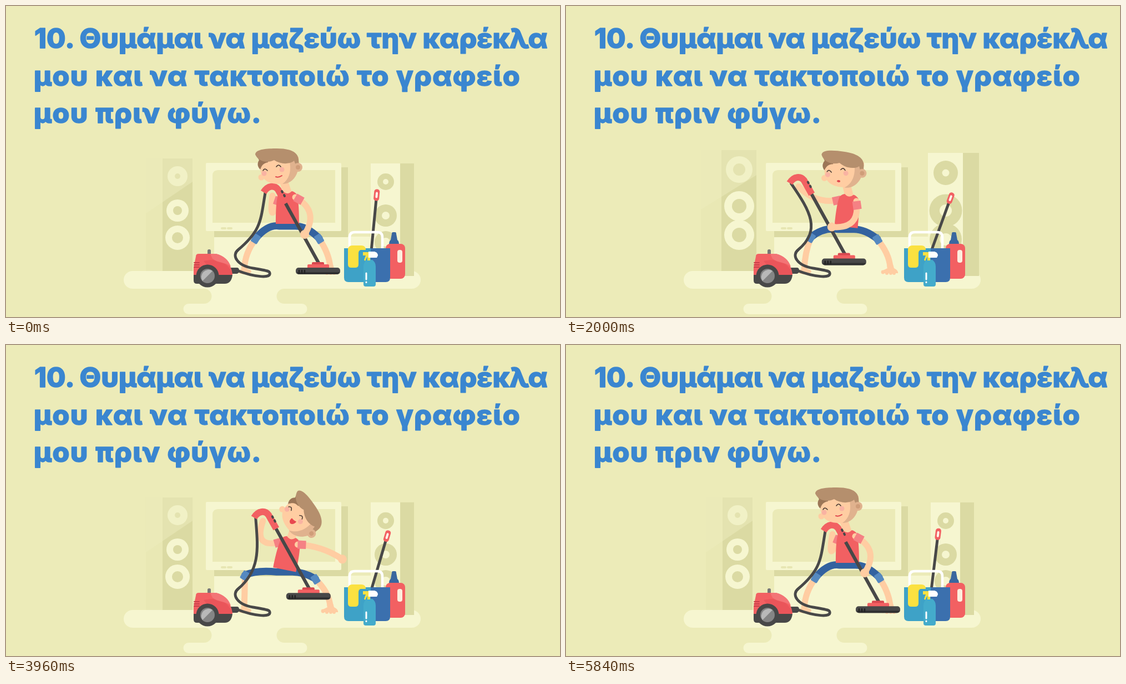
These frames come from a looping animation (998 by 561 pixels, 5.88 s). An HTML page:

```html
<!DOCTYPE html>
<html lang="el">
<head>
<meta charset="utf-8">
<title>Τακτοποίηση</title>
<style>
html, body { margin: 0; width: 100%; height: 100%; overflow: hidden; background: #ecebb8; }
svg { display: block; width: 998px; height: 561px; }
.title { font: 800 50px Inter, "Noto Sans", "Open Sans", sans-serif; fill: #3a86d0; stroke: #3a86d0; stroke-width: 1.5; stroke-linejoin: round; }
.loose { letter-spacing: 1.3px; }
.line { fill: none; stroke-linecap: round; stroke-linejoin: round; }
.skin { fill: #ffcda2; }
.limb { stroke: #ffcda2; stroke-width: 11; }
.cream { fill: #f6f6d0; }
.olive { fill: #dbdaa3; }
.red { fill: #f26062; }
.dark { fill: #484848; }
.hair { fill: #b58f6d; }
.hair2 { fill: #9c7657; }
.shade { fill: #e0b28e; }
.cheek { fill: #f9b3a2; }
.eye { stroke: #4b3b35; stroke-width: 1.6; }
.hose { stroke: #484848; stroke-width: 5; }
.sleeve { stroke: #f58184; stroke-width: 15; fill: none; }
.jeans { stroke: #33629f; stroke-width: 13; }
</style>
</head>
<body>
<svg viewBox="0 0 998 561">
  <g class="title">
    <text x="51" y="76">10. Θυμάμαι να μαζεύω την καρέκλα</text>
    <text x="50" y="144" class="loose">μου και να τακτοποιώ το γραφείο</text>
    <text x="50" y="211" class="loose">μου πριν φύγω.</text>
  </g>

  <!-- room -->
  <path class="cream" d="M228 510H357a13.5 13.5 0 0 1 0 27H329a9.5 9.5 0 0 0 0 19H533a9.5 9.5 0 0 0 0-19H501a13.5 13.5 0 0 1 0-27H731a16 16 0 0 0 0-32H228a16 16 0 0 0 0 32z"/>
  <path class="cream" d="M375 416H657V480H375z"/>
  <path class="olive" d="M375 291H616V417H375z"/>
  <rect class="cream" x="360" y="283" width="244" height="123" rx="2"/>
  <path fill="#ebeab7" d="M372 391V306q0-10 10-10H593V391z"/>
  <g fill="#e7e6b3"><rect x="387" y="399" width="10" height="4" rx="2"/><rect x="398" y="399" width="10" height="4" rx="2"/></g>

  <path id="sideL" fill="#e9e8b4"/>
  <path id="frontL" class="olive"/>
  <g id="conesL"></g>
  <path id="shine" fill="#eeedbd" opacity=".5"/>
  <path id="sideR" class="olive"/>
  <path id="frontR" class="cream"/>
  <g id="conesR"></g>

  <!-- cleaning kit -->
  <g id="mop">
    <path class="line hose" d="M0 0V-94"/>
    <rect class="red" x="-5" y="-112" width="10" height="21" rx="4.5"/>
    <rect fill="#fff3e8" x="-2" y="-107" width="4" height="11" rx="2"/>
  </g>
  <path class="line" stroke="#fff" stroke-width="4.5" d="M619 445V417q0-9 9-9H669q9 0 9 9V446"/>
  <path fill="#3a679f" d="M695 411q0-3 2-3h4q2 0 2 3l2 11q3 2 3 8h-18q0-6 3-8z"/>
  <rect class="red" x="684" y="429" width="35" height="63" rx="8"/>
  <rect fill="#fdeede" x="705" y="440" width="9" height="23" rx="4"/>
  <path fill="#3ea2c7" d="M609 437H660V498H617q-8 0-8-8z"/>
  <path fill="#3b70ae" d="M657 437H692V490q0 8-8 8H657z"/>
  <path fill="#fbe140" d="M616 440q0-8 8-8H640q8 0 8 8h-9q-4 1-4 6V466q0 6-6 6h-7q-6 0-6-6z"/>
  <path fill="#44abcb" d="M650 458H660q6 4 6 12V502q0 4-4 4H648q-4 0-4-4V470q0-8 6-12z"/>
  <path fill="#fbe140" d="M643 444H653L656 449V459H651V452L647 460 645 458 648 450H643z"/>
  <path fill="#fff" d="M653 443H664q6 2 6 7l-2 4H653z"/>
  <path class="line" stroke="#fff" stroke-width="3" d="M649 482V493M649 498v.5"/>

  <!-- boy -->
  <path id="shins" class="line limb"/>
  <path class="skin" d="M578 466H589L591 473Q599 477 598 482H570Q566 480 571 477L579 473z"/>
  <g class="skin"><circle cx="571" cy="480" r="3.4"/><circle cx="578" cy="482" r="3"/><circle cx="585" cy="482" r="3"/><circle cx="591" cy="482" r="3"/><ellipse cx="430" cy="479" rx="12" ry="5"/></g>
  <path id="jeans" class="line jeans"/>
  <g fill="#5589c0">
    <rect id="cuffL" x="-6.5" y="-8" width="13" height="16" rx="2"/>
    <rect id="cuffR" x="-6.5" y="-8" width="13" height="16" rx="2"/>
  </g>
  <path id="armL" class="line limb"/>
  <path id="neck" class="line" stroke="#ffcda2" stroke-width="15"/>
  <path id="sleeveL" class="sleeve"/>
  <path id="shirt" class="red"/>
  <path id="hose" class="line hose"/>
  <g id="vac">
    <path class="line" stroke="#484848" stroke-width="6" d="M-60-124L2-12"/>
    <path fill="none" stroke="#f26062" stroke-width="12" d="M-98-141C-90-154-78-154-72-146L-58-121"/>
    <path class="line" stroke="#484848" stroke-width="4" d="M-65-143l1 2M-61-136l1 2"/>
    <rect x="-11" y="-15" width="22" height="7" rx="2" fill="#d9484f"/>
    <rect class="red" x="-19" y="-11" width="39" height="8" rx="2"/>
    <rect class="dark" x="-40" y="-5" width="80" height="12" rx="5"/>
    <path fill="#303030" d="M-38 3H39q-2 4-5 4H-34q-3 0-4-4z"/>
    <path class="line" stroke="#222" stroke-width="2.5" d="M-34 0v4M-29 0v4M-24 0v4"/>
  </g>
  <path id="armR" class="line limb"/>
  <circle id="handR" class="skin" r="8"/>
  <path id="sleeveR" class="sleeve"/>

  <g id="head">
    <g id="front">
      <circle class="skin" cx="-31" cy="17" r="5.5"/>
      <path class="skin" d="M-33-8C-34 10-30 29 0 29 22 29 36 14 36-6V-20H-30z"/>
      <path class="shade" d="M36-6C36 14 24 29 7 29 20 20 24 4 19-15H36z"/>
      <path class="hair2" d="M-40-22C-36-14-32-14-20-18L-19-10C-29-8-30-4-33 3-38-2-39-8-35-14z"/>
      <path class="hair" d="M-42-24C-42-34-20-35-3-35 18-35 34-30 36-16L37-4 31-5 28-13C20-6 4-6-8-14-20-8-36-11-42-24z"/>
      <circle cx="35" cy="-1" r="8" class="shade"/><circle cx="35" cy="-1" r="4" fill="#cf9d79"/>
      <circle class="cheek" cx="-26" cy="10" r="4.5"/><circle class="cheek" cx="6" cy="3" r="4.5"/>
      <path class="line eye" d="M-28 5q3-6 8 0M-4-2q4-6 8 0"/>
      <path id="smile" class="line" stroke="#e0484f" stroke-width="2" d="M-5 16q5 2 11-2"/>
      <ellipse id="oo" cx="-5" cy="19" rx="3" ry="2" fill="#e0484f"/>
      <path id="open" fill="#e8484f" d="M-8 12Q-3 12 2 9 4 18-2 20-8 19-8 12z"/>
    </g>
    <g id="sing" transform="rotate(-24) translate(0 -5)">
      <ellipse class="skin" cx="-4" cy="4" rx="33" ry="30"/>
      <path class="shade" d="M34-5C36 22 22 36 5 34 13 25 6 5 10 0z"/>
      <path class="hair2" d="M-33-27C-34-16-37-6-31-1L-25-4-18-14z"/>
      <path class="hair" d="M-33-31C-33-38-24-37-12-32 14-29 38-22 35 8 34 14 32 17 29 18L20 8C12 10 7 8 8 0-8 0-18-6-24-12-34-19-34-26-33-31z"/>
      <circle cx="19" cy="16" r="8" class="shade"/><circle cx="19" cy="16" r="4" fill="#cf9d79"/>
      <circle class="cheek" cx="-6" cy="7" r="4"/>
      <path class="line eye" d="M-18 2q4-6 8 0"/>
      <path fill="#d63c46" d="M-30 10L-18 11V25L-29 28z"/>
      <path fill="#f47474" d="M-29 28Q-29 20-18 21V25z"/>
    </g>
  </g>

  <!-- cleaner body -->
  <rect fill="#777" x="363" y="439" width="6" height="20" rx="2.5"/>
  <path class="dark" d="M404 472H416q4 0 4 5t-4 6H404z"/>
  <path class="red" d="M342 452q0-5 5-5H378C394 450 406 466 408 484L400 492H338V472z"/>
  <path fill="#ea555a" d="M356 460C382 454 402 464 408 484L400 490H380z"/>
  <path fill="#f37476" d="M368 447H378C392 450 401 458 405 470 396 462 382 464 372 456z"/>
  <path class="line" stroke="#c93e48" stroke-width="1.8" d="M339 463h9M339 467h9M339 471h9"/>
  <path class="dark" d="M338 485H408Q406 501 394 501H344q-6 0-6-6z"/>
  <circle class="dark" cx="363" cy="487" r="20.5"/>
  <circle cx="363" cy="487" r="13" fill="#858585"/>
  <path fill="#b9b9b9" d="M354 496a13 13 0 0 1 18-18z"/>
</svg>
<script>
const LOOP = 5880, BEAT = LOOP / 4, SWING = LOOP / 10, STEP = 40, TAU = 2 * Math.PI;
const $ = id => document.getElementById(id);
const set = (id, attrs) => { for (const k in attrs) $(id).setAttribute(k, attrs[k]); };
const path = (id, d) => set(id, { d });
const mix = (a, b, k) => a + (b - a) * k;
const clamp = v => Math.min(1, Math.max(0, v));
const easeOut = v => 1 - (1 - clamp(v)) ** 2;
const smooth = v => { v = clamp(v); return v * v * (3 - 2 * v); };
const degrees = a => a * 360 / TAU;

// Dance poses; the hand is relative to the cleaner head.
const POSES = [
  { at: 0, turn: 0, lean: 0, hand: [-24, -65], mouth: "smile" },
  { at: 760, turn: 24, lean: 2, hand: [-24, -65], mouth: "sing" },
  { at: 2000, turn: 8, lean: 3, hand: [-22, -62], mouth: "oo" },
  { at: 3120, turn: 22, lean: 5, hand: [67, -39], mouth: "sing" },
  { at: 3960, turn: 55, lean: 6.5, hand: [61, -66], mouth: "open" },
  { at: 4480, turn: 26, lean: 1, hand: [1, -60], mouth: "open" },
];
POSES.push({ ...POSES[0], at: LOOP - STEP });

function poseAt(t) {
  const i = Math.max(1, POSES.findIndex(p => p.at > t));
  const [a, b] = t >= LOOP - STEP ? POSES.slice(-2) : [POSES[i - 1], POSES[i]];
  const k = smooth((t - a.at) / (b.at - a.at));
  return {
    turn: mix(a.turn, b.turn, k),
    lean: mix(a.lean, b.lean, k),
    hand: a.hand.map((v, j) => mix(v, b.hand[j], k)),
    mouth: (k < .5 ? a : b).mouth,
  };
}

// Quick pull, slow push, lifted twice per beat.
function cleanerAt(p) {
  const pull = easeOut(p / .22) - smooth((p - .3) / .6);
  return [562 - 63 * pull, 477 - 28 * Math.sin(TAU * p) ** 2];
}

function addCones(id, outer, inner) {
  $(id).innerHTML = `<circle class="${outer}"/><circle class="${inner}"/>`.repeat(3);
}
addCones("conesL", "cream", "olive");
addCones("conesR", "olive", "cream");

// cones: rest and swollen [y, radius, hole]
function drawCones(id, cx, k, rest, full) {
  [...$(id).children].forEach((c, i) => {
    const [cy, r, hole] = rest[i >> 1].map((v, j) => mix(v, full[i >> 1][j], k));
    c.setAttribute("cx", cx);
    c.setAttribute("cy", cy);
    c.setAttribute("r", i % 2 ? hole : r);
  });
}

const box = (l, t, r, b) => `M${l} ${t}H${r}V${b}H${l}z`;

function drawSpeakers(p) {
  const k = smooth(p / .17) * (1 - smooth((p - .36) / .35)), kr = Math.min(1, 1.3 * k);
  const l = mix(252, 243, k), m = mix(282, 280, k), r = mix(336, 343, k), top = mix(275, 260, k);
  path("sideL", box(l, top, m, 478));
  path("frontL", box(m, top, r, 478));
  path("shine", `M${l} ${top}H${r}V${mix(317, 305, k)}L${l} ${mix(374, 367, k)}z`);
  drawCones("conesL", mix(309, 312, k), k, [[307, 18, 5], [369, 20, 8], [418, 22, 10]], [[295, 24, 11], [361, 27, 13], [413, 27, 13]]);

  const edge = mix(710, 715, kr), topR = mix(284, 265, kr);
  path("sideR", box(edge, topR, mix(735, 744, kr), 487));
  path("frontR", box(mix(657, 652, kr), topR, edge, 487));
  drawCones("conesR", 684, kr, [[317, 15, 5], [378, 20, 7], [426, 20, 8]], [[301, 22, 6.5], [369, 29.5, 11], [421, 29, 11]]);
}

// Bends an arm of fixed reach between shoulder and hand, with its sleeve.
function drawArm(side, [sx, sy], [hx, hy]) {
  const dx = hx - sx, dy = hy - sy, d = Math.hypot(dx, dy);
  const bend = Math.sqrt(Math.max(0, 61 ** 2 - d * d / 2)) / d;
  const cx = (sx + hx) / 2 + dy * bend, cy = (sy + hy) / 2 - dx * bend;
  path("arm" + side, `M${sx} ${sy}Q${cx} ${cy} ${hx} ${hy}`);
  const cut = 15 / Math.hypot(cx - sx, cy - sy);
  path("sleeve" + side, `M${sx} ${sy}L${mix(sx, cx, cut)} ${mix(sy, cy, cut)}`);
}

function drawBoy(t, vx, vy) {
  const { turn, lean, hand, mouth } = poseAt(t);
  const nx = 507 + lean, ny = 336 + 1.9 * lean, hx = 507 - .8 * lean, hy = 393 + 1.9 * lean;
  const ax = 450 - 3 * lean, ay = 420 - .6 * lean, bx = 564 - lean, by = 420 + .4 * lean;

  path("shins", `M${ax} ${ay}Q430 445 429 477M${bx} ${by}Q582 446 584 471`);
  path("jeans", `M${ax} ${ay - 1}Q${ax + 22} ${hy} ${hx - 14} ${hy + 4}H${hx + 14}Q${bx - 22} ${hy + 4} ${bx} ${by - 1}`);
  set("cuffL", { transform: `translate(${ax} ${ay}) rotate(32)` });
  set("cuffR", { transform: `translate(${bx} ${by}) rotate(-32)` });

  const tilt = Math.atan2(nx - hx, hy - ny), len = Math.hypot(nx - hx, hy - ny);
  const sin = Math.sin(tilt), cos = Math.cos(tilt);
  const shoulder = s => [nx + s * 14 * cos - 9 * sin, ny + s * 14 * sin + 9 * cos];
  const grip = [vx + hand[0], vy + hand[1]];
  drawArm("L", shoulder(-1), [vx - 82, vy - 135]);
  drawArm("R", shoulder(1), grip);
  set("handR", { cx: grip[0], cy: grip[1] });
  path("shirt", `M-17 4Q-13-1-8-2Q0 6 8-2Q13-1 17 4C20 16 21 30 21 ${len}H-21C-21 30-20 16-17 4z`);
  set("shirt", { transform: `translate(${nx} ${ny}) rotate(${degrees(tilt)})` });

  const x = nx - 16 + .58 * turn, y = ny - 44 + turn * turn / 400;
  path("neck", `M${nx} ${ny}L${mix(nx, x, .35)} ${ny - 16}`);
  set("head", { transform: `translate(${x} ${y}) rotate(${turn})` });
  const show = (id, on) => set(id, { display: on ? "inline" : "none" });
  show("front", mouth !== "sing");
  for (const id of ["smile", "oo", "open", "sing"]) show(id, mouth === id);
}

function drawCleaner(vx, vy) {
  set("vac", { transform: `translate(${vx} ${vy})` });
  const px = vx - 95, py = vy - 140;
  path("hose", `M${px} ${py}C${mix(px, 455, .7)} ${py + 50} 460 405 418 440C406 450 416 468 445 473S476 478 475 484S450 490 416 477`);
}

function drawMop(t) {
  const tip = 24.5 - 15 * Math.cos(TAU * (t / SWING - .03));
  set("mop", { transform: `translate(658 442) rotate(${degrees(Math.asin(tip / 102))})` });
}

function draw(t) {
  const p = t % BEAT / BEAT, [vx, vy] = cleanerAt(p);
  drawSpeakers(p);
  drawBoy(t, vx, vy);
  drawCleaner(vx, vy);
  drawMop(t);
}

const start = performance.now();
function tick() {
  const t = (performance.now() - start) % LOOP;
  draw(Math.floor(t / STEP) * STEP);
  requestAnimationFrame(tick);
}
tick();
</script>
</body>
</html>
```
